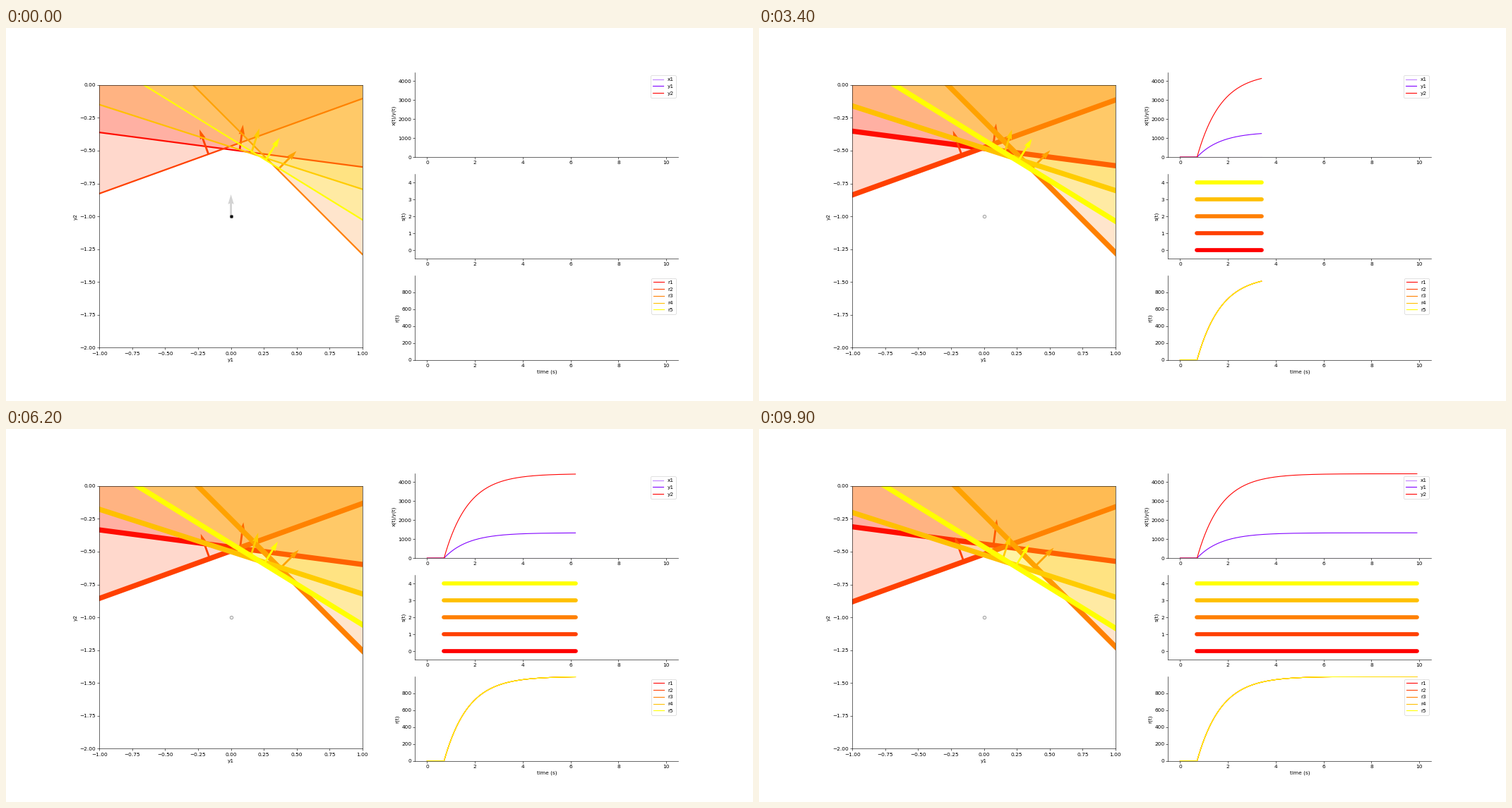
A matplotlib script for the animation above (10000 ms loop, 1058 by 529 pixels).

```python
import numpy as np
import matplotlib.pyplot as plt
from matplotlib.animation import FuncAnimation
from matplotlib.patches import Polygon

FRAMES, STEP = 100, 0.1
T_SPIKE = 0.708          # the output reaches the first boundary here
THRESH = 0.503           # distance of each boundary from the start point
START = np.array([0.0, -1.0])
LIGHT = "#d3d3d3"

angles = np.radians([7.49, -19.87, 45.05, 17.85, 31.7])
normals = np.column_stack([np.sin(angles), np.cos(angles)])
gains = np.array([1, -1.03, 0.93, -1, -0.96])
colors = plt.cm.autumn(np.linspace(0, 1, 5))
purple, red = plt.cm.rainbow([0.0, 1.0])

# Simulated signals
time = np.linspace(0, 10, 1001)
rate = 1000 * (1 - np.exp(-np.maximum(time - T_SPIKE, 0)))
y1, y2 = normals.sum(axis=0)[:, None] * rate
y2 = np.where(time < T_SPIKE, -np.exp(-time), y2)


def drift(t):
    """Leaky response to an input that ramps up from one second on."""
    s = max(t - 1, 0)
    return 0.00633 * (s - 1 + np.exp(-s))


def arrow(ax, pos, vec, color, z):
    return ax.quiver([pos[0]], [pos[1]], [vec[0]], [vec[1]], color=[color],
                     scale_units="xy", scale=1, width=0.0075, zorder=z)


fig = plt.figure(figsize=(20, 10), dpi=52.9)
grid = fig.add_gridspec(3, 2)

# Output space with the boundaries
space = fig.add_subplot(grid[:, 0])
space.set(xlim=(-1, 1), ylim=(-2, 0), xlabel="y1", ylabel="y2",
          xticks=np.arange(-1, 1.01, 0.25), yticks=np.arange(-2, 0.01, 0.25))
space.set_aspect("equal")

areas, edges, arrows = [], [], []
for i, (n, c) in enumerate(zip(normals, colors)):
    z = 2 + 0.05 * i
    areas.append(space.add_patch(
        Polygon(np.zeros((4, 2)), fc=c, alpha=0.2, lw=0, zorder=z)))
    arrows.append(arrow(space, START, 0.2 * n, c, z + 0.01))
    edges += space.plot([], [], color=c, zorder=z + 0.02)

pull = arrow(space, START, (0, 0.167), LIGHT, 2.3)
dot, = space.plot([], [], "o", color="black", ms=6, zorder=2.32)
space.plot(*START, "o", mfc="none", mec="gray", ms=6, zorder=2.34)


# Time courses
def panel(row, ylim, yticks, ylabel):
    ax = fig.add_subplot(grid[row, 1])
    ax.set(xlim=(-0.5, 10.5), ylim=ylim, xticks=range(0, 11, 2),
           yticks=yticks, ylabel=ylabel)
    ax.spines[["top", "right"]].set_visible(False)
    return ax


signals = panel(0, (-8, y2.max()), range(0, 4001, 1000), "x(t)/y(t)")
spikes = panel(1, (-0.5, 4.5), range(5), "s(t)")
rates = panel(2, (0, rate.max()), range(0, 801, 200), "r(t)")
rates.set_xlabel("time (s)")

x1 = np.array([drift(t) for t in time])
curves = []
for data, label, color, alpha in [(x1, "x1", purple, 0.5),
                                  (y1, "y1", purple, 1),
                                  (y2, "y2", red, 1)]:
    line, = signals.plot([], [], color=color, alpha=alpha, label=label)
    curves.append((line, data))

bars = []
for i, c in enumerate(colors):
    bars += spikes.plot([], [], color=c, lw=7.8, solid_capstyle="round")
    line, = rates.plot([], [], color=c, label=f"r{i + 1}")
    curves.append((line, rate))

signals.legend(loc="upper right")
rates.legend(loc="upper right")


def update(k):
    t = k * STEP
    spiking = t > T_SPIKE

    shift = drift(t)
    for n, g, area, edge, arr in zip(normals, gains, areas, edges, arrows):
        foot = START + (THRESH + g * shift) * n
        side = 4 * np.array([n[1], -n[0]])
        a, b = foot - side, foot + side
        area.set_xy([a, b, b + 4 * n, a + 4 * n])
        edge.set_data([a[0], b[0]], [a[1], b[1]])
        edge.set_linewidth(10 if spiking else 3)
        arr.set_offsets([foot])

    level = np.exp(-t)
    dot.set_data([0], [-level])
    pull.set_offsets([(0, -level)])
    pull.set_UVC([0], [0.167 * level])
    dot.set_visible(not spiking)
    pull.set_visible(not spiking)

    end = 10 * k + 1
    for line, data in curves:
        line.set_data(time[:end], data[:end])
    for i, bar in enumerate(bars):
        bar.set_data([T_SPIKE, t] if spiking else [], [i, i] if spiking else [])


anim = FuncAnimation(fig, update, frames=FRAMES, interval=100,
                     repeat=True, repeat_delay=0)
plt.show()
```
